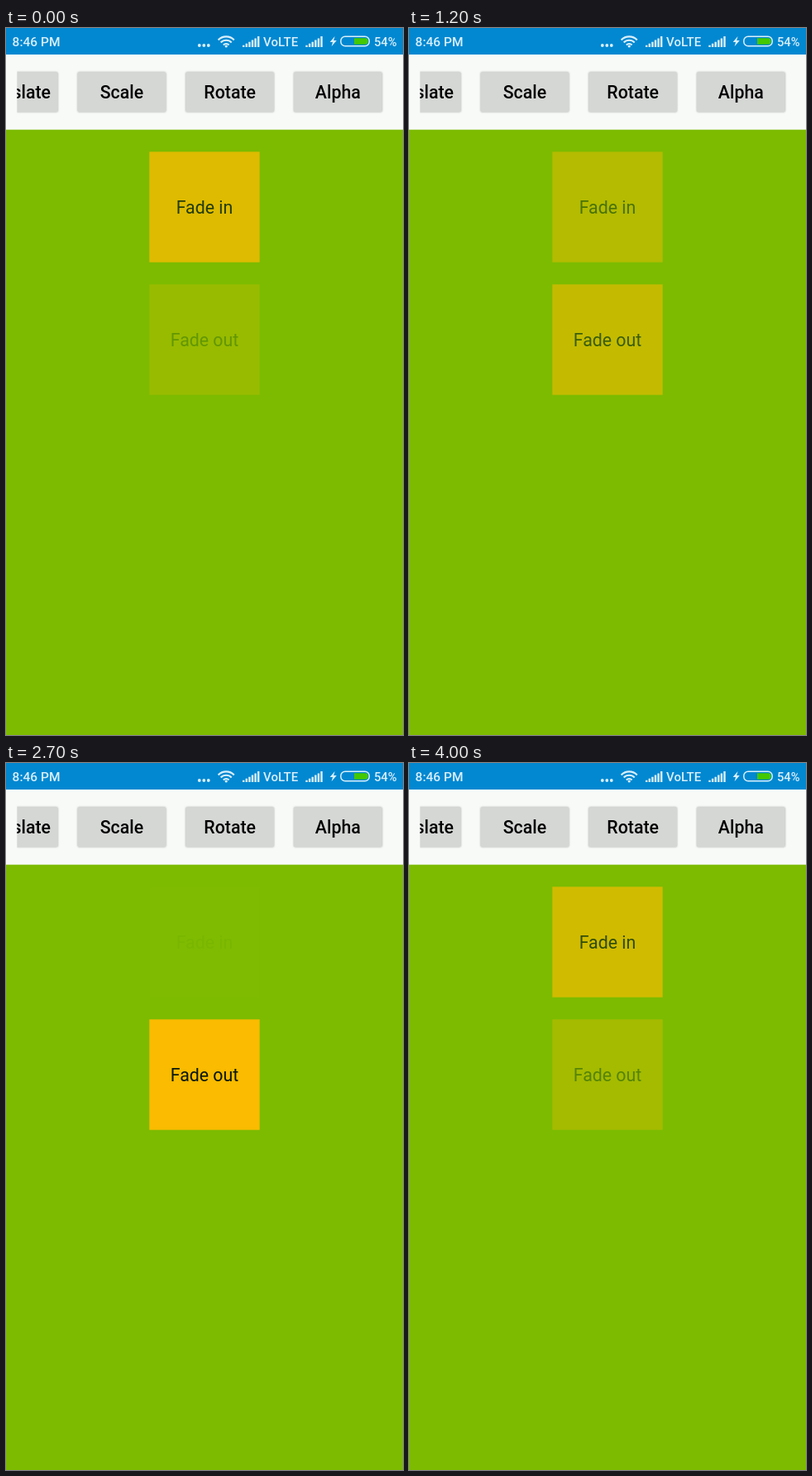
Write an HTML page that moves like this. It is 480 px wide and 853 px high and loops after 4.1 s.

```html
<!DOCTYPE html>
<html lang="en">
<head>
<meta charset="utf-8">
<title>Alpha animation</title>
<style>
  html, body { margin: 0; width: 100%; height: 100%; overflow: hidden; background: #7cbb00; }
  svg { display: block; width: 480px; height: 853px; font-family: Roboto, sans-serif; }
  .status { fill: #d9effb; font-weight: 500; font-size: 15px; }
  .buttons rect { fill: #d5d7d5; filter: drop-shadow(0 .8px 1px rgba(0, 0, 0, .3)); }
  .buttons text { font-weight: 500; }
  .buttons text, .box text { font-size: 21.33px; text-anchor: middle; }
  .box rect { fill: #fb0; }
  .box text { fill: #04120c; }
  .box { animation: 4.1s infinite; }
  .in { animation-name: fade-in; }
  .out { animation-name: fade-out; }

  /* ten opacity steps per second, with a hard restart at 2.8 s */
  @keyframes fade-in {
    0% { opacity: .75; animation-timing-function: steps(28); }
    68.29% { opacity: 0; animation-timing-function: step-end; }
    68.2901% { opacity: .985; animation-timing-function: steps(13); }
    100% { opacity: .626; }
  }
  @keyframes fade-out {
    0% { opacity: .215; animation-timing-function: steps(28); }
    68.29% { opacity: .995; animation-timing-function: step-end; }
    68.2901% { opacity: .003; animation-timing-function: steps(13); }
    100% { opacity: .345; }
  }
</style>
</head>
<body>
<svg viewBox="0 0 480 853">
  <defs>
    <clipPath id="scroller"><rect x="13.33" y="32" width="453.34" height="91"/></clipPath>
    <path id="bars" d="M0 23v-2.2h2.4V23zM3.6 23v-4.2H6V23zM7.2 23v-6.2h2.4V23zM10.8 23v-8.4h2.4V23zM14.4 23v-10.6h2.4V23zM18 23V10h2.4v13z"/>
  </defs>

  <rect width="480" height="853" fill="#7cbb00"/>
  <rect y="32" width="480" height="90.67" fill="#f8faf8"/>
  <rect width="480" height="32" fill="#0288d1"/>

  <g class="status">
    <text x="7.6" y="22" font-size="15.5">8:46 PM</text>
    <circle cx="233.8" cy="21" r="1.9"/>
    <circle cx="239.3" cy="21" r="1.9"/>
    <circle cx="244.8" cy="21" r="1.9"/>
    <g fill="none" stroke="#d9effb" stroke-width="2.1">
      <path d="M256.6 14.4a13.4 13.4 0 0 1 19.2 0M259.7 17.6a9 9 0 0 1 13 0M262.8 20.5a4.9 4.9 0 0 1 6.8 0"/>
    </g>
    <circle cx="266.2" cy="22" r="1.6"/>
    <use href="#bars" x="286"/>
    <text x="311" y="22">VoLTE</text>
    <use href="#bars" x="362.3"/>
    <path d="M397.6 10l-6 7h3.4l-1.4 5.2 6.2-7.2h-3.6z"/>
    <rect x="404.8" y="10.3" width="34.4" height="11.4" rx="5.2" fill="none" stroke="#d9effb" stroke-width="1.5"/>
    <path d="M421 12.3h13.4a3.2 3.2 0 0 1 3.2 3.2v1a3.2 3.2 0 0 1-3.2 3.2H421z" fill="#43c800"/>
    <text x="445" y="22" font-size="14.7">54%</text>
  </g>

  <g class="buttons" clip-path="url(#scroller)">
    <rect x="-44" y="53.33" width="106.67" height="48" rx="1.5"/>
    <rect x="86.67" y="53.33" width="106.67" height="48" rx="1.5"/>
    <rect x="217.33" y="53.33" width="106.67" height="48" rx="1.5"/>
    <rect x="348" y="53.33" width="106.67" height="48" rx="1.5"/>
    <text x="9.33" y="85.3">Translate</text>
    <text x="140" y="85.3">Scale</text>
    <text x="270.67" y="85.3">Rotate</text>
    <text x="401.33" y="85.3">Alpha</text>
  </g>

  <g class="box in">
    <rect x="173.33" y="149.33" width="133.33" height="133.33"/>
    <text x="240" y="224">Fade in</text>
  </g>
  <g class="box out">
    <rect x="173.33" y="309.33" width="133.33" height="133.33"/>
    <text x="240" y="384">Fade out</text>
  </g>
</svg>
</body>
</html>
```
